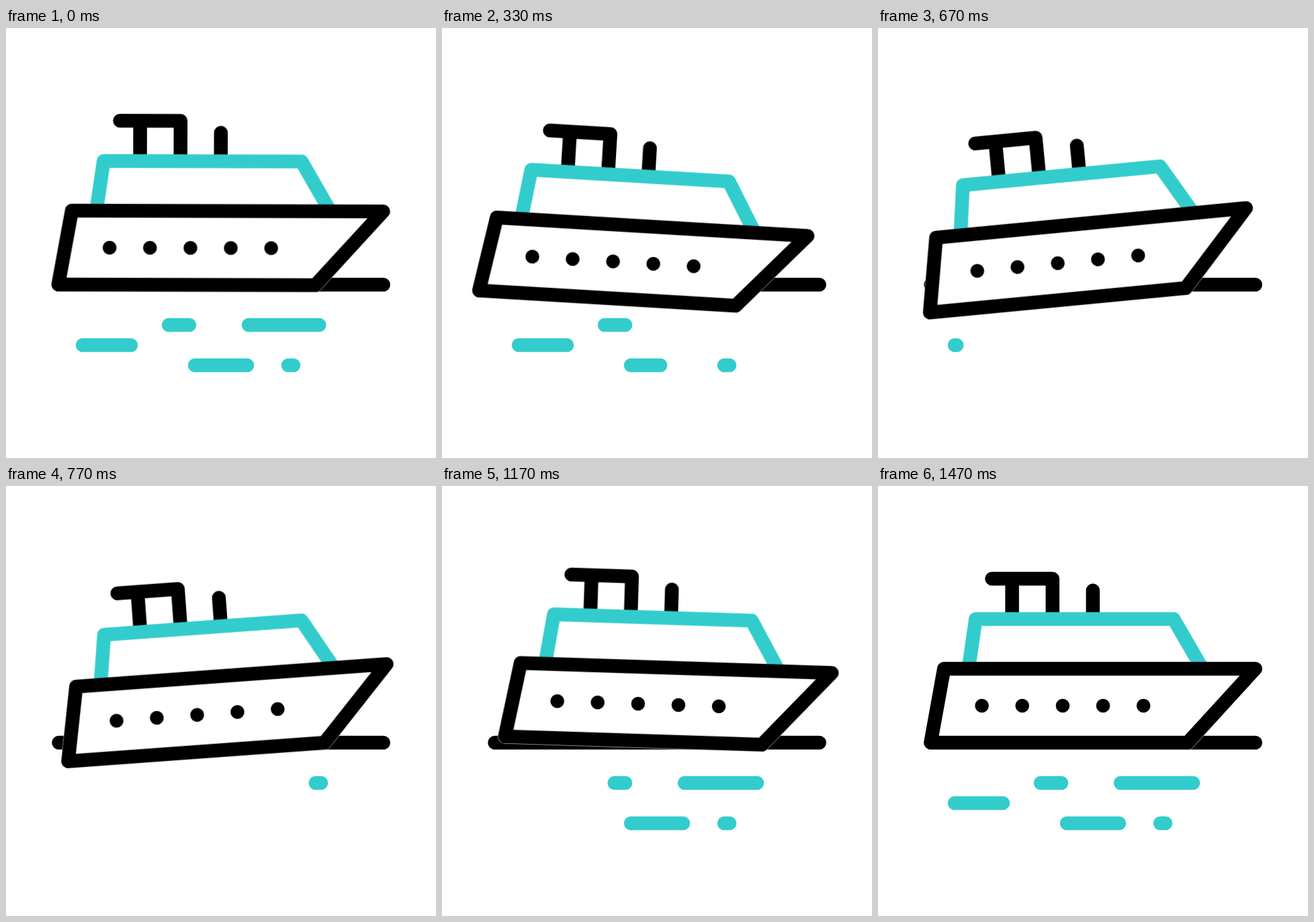
An HTML page that plays this animation: 640x640 px, repeating every 1.67 s.

```html
<!DOCTYPE html>
<html lang="en">
<head>
<meta charset="utf-8">
<title>Yacht on the waves</title>
<style>
  @property --cut { syntax: "<length>"; inherits: true; initial-value: 0px; }
  @property --grow { syntax: "<length>"; inherits: true; initial-value: 300px; }

  html, body { margin: 0; width: 100%; height: 100%; overflow: hidden; background: #fff; }
  svg {
    display: block; width: 100vw; height: 100vh;
    fill: none; stroke: #000; stroke-width: 20.5;
    stroke-linecap: round; stroke-linejoin: round;
    --smooth: cubic-bezier(.333, 0, .667, 1);
  }
  .teal { stroke: #3cc; }
  .dots { fill: #000; stroke: none; }
  .mask { fill: #fff; stroke: #fff; stroke-width: 21.3; }

  .sway, .heave, .pitch, .waves { animation: 1670ms var(--smooth) infinite; }
  .sway { animation-name: sway; }
  .heave { animation-name: heave; }
  .pitch { animation-name: pitch; transform-origin: 367.5px 327px; }
  .waves { animation-name: waves; }

  /* --s: distance of the dash along the whole wave trail, --l: its length */
  .waves path {
    stroke-dasharray: var(--l) 999px;
    stroke-dashoffset: calc(
      clamp(0px, var(--s) + var(--l) - var(--grow), var(--l) + .1px) -
      clamp(0px, var(--cut) - var(--s), var(--l) + .1px));
  }

  @keyframes sway {
    0% { transform: translateX(-.4px); animation-timing-function: cubic-bezier(.333, .11, .667, 1); }
    29% { transform: translateX(-26px); }
    59% { transform: translateX(32.2px); }
    82%, 100% { transform: translateX(0); }
  }
  @keyframes heave {
    0% { transform: translateY(.5px); animation-timing-function: cubic-bezier(.333, .13, .667, 1); }
    24.6% { transform: translateY(28.3px); animation-timing-function: cubic-bezier(.344, 0, .436, 1); }
    62%, 100% { transform: translateY(0); }
  }
  @keyframes pitch {
    0% { transform: rotate(.14deg); animation-timing-function: cubic-bezier(.333, .18, .667, 1); }
    16% { transform: rotate(4.04deg); }
    40% { transform: rotate(-5.46deg); }
    64% { transform: rotate(2.5deg); }
    82%, 100% { transform: rotate(0deg); }
  }
  @keyframes waves {
    0% { --cut: 2.5px; --grow: 300px; animation-timing-function: cubic-bezier(.333, .09, .667, 1); }
    43.4% { --cut: 298px; --grow: 300px; animation-timing-function: step-end; }
    43.41% { --cut: 0px; --grow: 1.2px; animation-timing-function: cubic-bezier(.333, .07, .667, 1); }
    86%, 100% { --cut: 0px; --grow: 298px; }
  }
</style>
</head>
<body>
<svg viewBox="0 0 640 640">
  <defs>
    <path id="hull" d="M98.3 271.9H561.7L461 382H78.4Z"/>
  </defs>

  <path d="M78.5 382H561.7"/>

  <g class="waves teal">
    <path d="M469 442h-108" style="--s:0px;--l:108px"/>
    <path d="M359 502h-78" style="--s:108px;--l:78px"/>
    <path d="M428 502h-8" style="--s:186px;--l:8px"/>
    <path d="M273 442h-31" style="--s:194px;--l:31px"/>
    <path d="M186 472h-72" style="--s:225px;--l:72px"/>
  </g>

  <g class="sway"><g class="heave"><g class="pitch">
    <use href="#hull" class="mask"/>
    <path d="M169.5 138H259.8V192M199.6 138V192M319.8 155.5V192"/>
    <path class="teal" stroke-linecap="butt" d="M135.3 268L145.4 198H440L480.5 268"/>
    <use href="#hull"/>
    <g class="dots">
      <circle cx="154.6" cy="327" r="10.3"/>
      <circle cx="214.7" cy="327" r="10.3"/>
      <circle cx="274.9" cy="327" r="10.3"/>
      <circle cx="335" cy="327" r="10.3"/>
      <circle cx="395.1" cy="327" r="10.3"/>
    </g>
  </g></g></g>
</svg>
</body>
</html>
```
